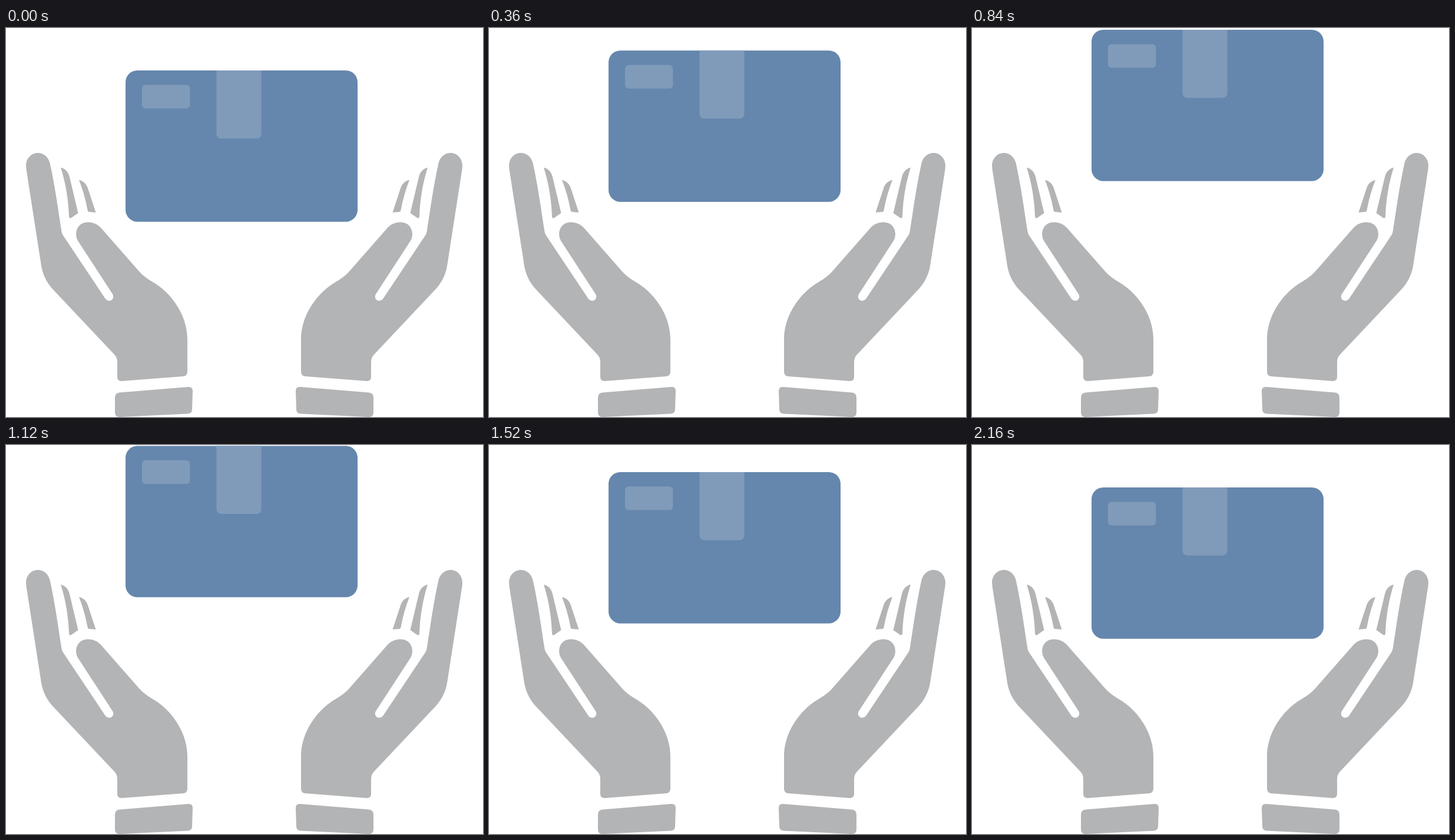
Write an HTML page with a canvas that moves like this. It is 810 px wide and 660 px high and loops after 2200 ms.

```html
<!DOCTYPE html>
<html>
<head>
<meta charset="utf-8">
<style>
html, body { margin: 0; width: 100%; height: 100%; overflow: hidden; background: #fff; }
canvas { display: block; width: 810px; height: 660px; }
</style>
</head>
<body>
<canvas id="stage" width="810" height="660"></canvas>
<script>
const ctx = document.getElementById('stage').getContext('2d');
const LOOP = 2200, HALF = LOOP / 2, STEP = 40;
const LOW = 72, HIGH = 1.5;

const hand = new Path2D(
  // palm, index finger and thumb
  'M34 234 C34 221 43 212 54 212 C64 212 72 219 74.500 229 C84 272 89 312 94.500 346 ' +
  'Q95 349 97 352 L168.500 459 C171 463 177 464 180 461 C182.500 458.500 183 455 181 451.500 ' +
  'L122 361 Q119 356 119 350 C119 338 127 329.500 139 329.500 C148 329.500 156 333 162 340 ' +
  'L227 414 C239 427 252 431 265 442 C291 464 308 496 308 528 L308 583 Q308 590 301 591 ' +
  'L197 599 Q189 599.500 189 592 L189 567 Q189 559 184 554 L83 447 ' +
  'C72 436 63 422 60 404 L34.500 240 Z ' +
  // far fingers
  'M93 237 C100 238 106 244 108 253 L122.500 314 L111 322 Q107.500 324 107 320 ' +
  'C106 290 101 262 93 237 Z ' +
  'M124 258 C131 259 137 265 139 272 L152.500 313 L141 312 Q139 312 138.500 309 ' +
  'C135 290 130 273 124 258 Z ' +
  // cuff
  'M185 627 Q185 619 193 618.500 L309 609 Q317 608 317 616 L316 647 Q316 654 309 654.500 ' +
  'L193 660 Q185 660 185 652 Z');

// Easing as a monotone cubic through a few points
const EX = [0, .1, .17, .236, .327, .382, .509, .564, .673, .764, 1];
const EY = [0, .012, .036, .092, .478, .631, .837, .887, .953, .979, 1];
const chord = i => (EY[i + 1] - EY[i]) / (EX[i + 1] - EX[i]);
const slope = EX.map((_, i) => {
  if (i === 0 || i === EX.length - 1) return 0;
  const a = chord(i - 1), b = chord(i);
  return 2 * a * b / (a + b);
});

function ease(x) {
  let i = 0;
  while (i < EX.length - 2 && x > EX[i + 1]) i++;
  const w = EX[i + 1] - EX[i], u = (x - EX[i]) / w, v = 1 - u;
  return EY[i] * v * v * (1 + 2 * u) + EY[i + 1] * u * u * (3 - 2 * u) +
    w * u * v * (slope[i] * v - slope[i + 1] * u);
}

function boxTop(t) {
  const k = ease((t % HALF) / HALF);
  return t < HALF ? LOW + (HIGH - LOW) * k : HIGH + (LOW - HIGH) * k;
}

function panel(x, y, w, h, r, color) {
  ctx.fillStyle = color;
  ctx.beginPath();
  ctx.roundRect(x, y, w, h, r);
  ctx.fill();
}

function drawHands() {
  ctx.fillStyle = '#b3b4b6';
  ctx.fill(hand);
  ctx.save();
  ctx.translate(809, 0);
  ctx.scale(-1, 1);
  ctx.fill(hand);
  ctx.restore();
}

function drawBox(y) {
  panel(203, y, 394, 256.7, 20, '#6587ad');
  panel(231, y + 24.5, 81.3, 40, 6, '#809bba');
  panel(357.5, y, 76, 115.5, [0, 0, 8, 8], '#809bba');
}

function draw(now) {
  const t = Math.floor((now % LOOP) / STEP) * STEP;
  ctx.fillStyle = '#fff';
  ctx.fillRect(0, 0, 810, 660);
  drawHands();
  drawBox(boxTop(t));
}

let start;
function tick(now) {
  if (start === undefined) start = now;
  draw(now - start);
  requestAnimationFrame(tick);
}
draw(0);
requestAnimationFrame(tick);
</script>
</body>
</html>
```
